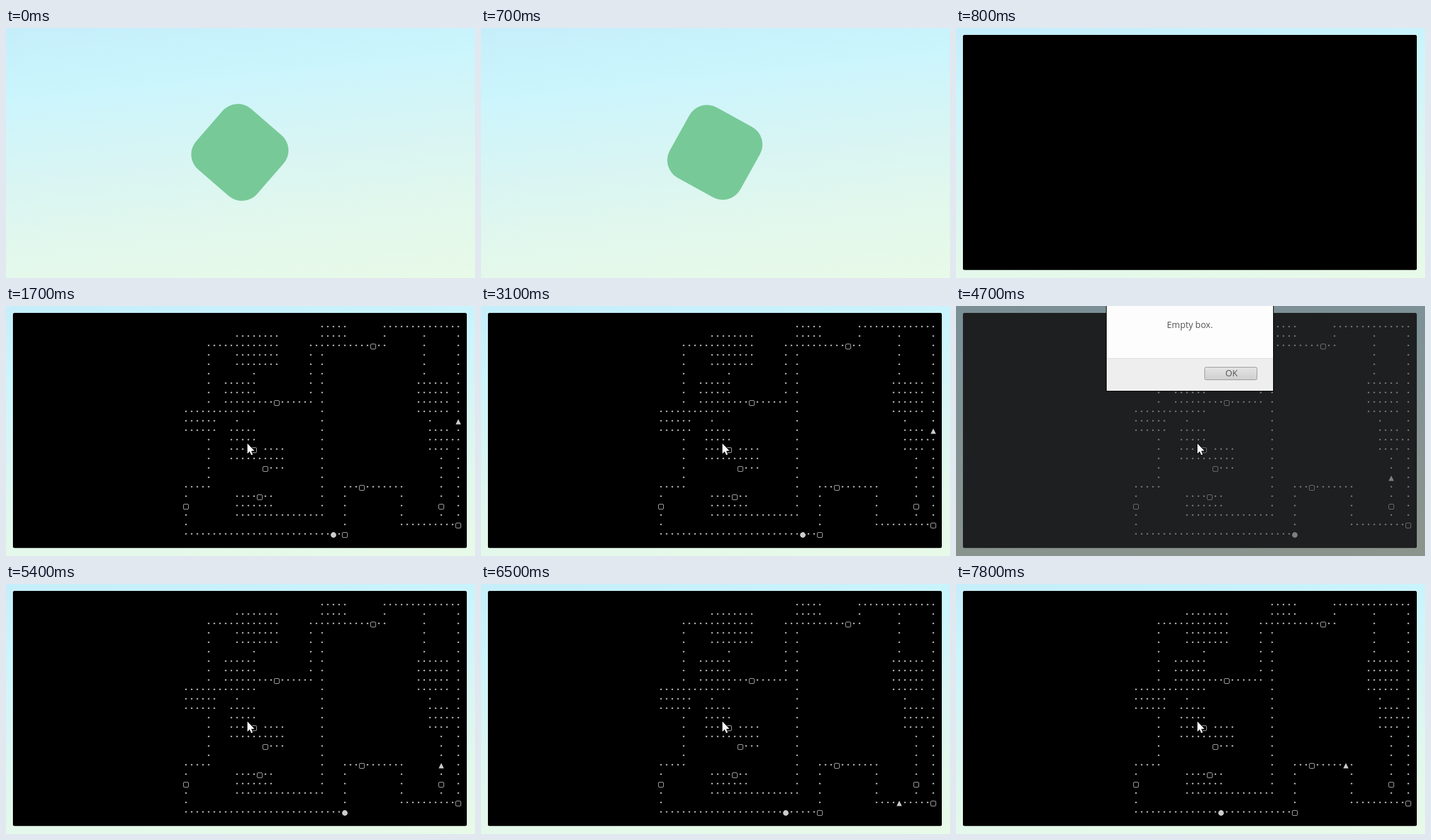
Animation, 744 px wide and 398 px high, one loop 8 s. Source, as an HTML page:

```html
<!DOCTYPE html>
<html lang="en">
<head>
<meta charset="utf-8">
<title>Box hunt</title>
<style>
  html, body { margin: 0; width: 100%; height: 100%; overflow: hidden; }
  body {
    background: linear-gradient(174deg, #c5eefa 0%, #cbf5fd 23%, #d9f5f3 52%, #e2f8ec 76%, #e8fae8 100%);
  }
  svg { display: block; width: 744px; height: 398px; }
  text { font: 14px "Open Sans", "Noto Sans", sans-serif; fill: #555; text-anchor: middle; }
  .glyph { fill: #ccc; }
  .chest { fill: none; stroke: #aaa; }
</style>
</head>
<body>
<svg viewBox="0 0 744 398">
  <defs>
    <linearGradient id="face" x2="0" y2="1">
      <stop stop-color="#e4e4e4"/>
      <stop offset="1" stop-color="#cfcfcf"/>
    </linearGradient>
  </defs>

  <rect id="spinner" x="-64" y="-64" width="128" height="128" rx="32" fill="#78c998"/>

  <rect id="panel" x="11" y="11" width="720" height="374.2" rx="2.5"/>

  <g id="board">
    <g id="tiles"></g>
    <circle id="player" class="glyph" r="4.4"/>
    <path id="hunter" class="glyph" d="M0-4.5 4.2 4H-4.2Z"/>
  </g>

  <g id="dialog">
    <rect width="744" height="398" fill="rgb(58,59,61)" fill-opacity=".53"/>
    <rect x="238.5" y="-5.5" width="265" height="141" fill="#fdfdfd" stroke="#000"/>
    <rect x="239" y="83" width="264" height="52" fill="#eee"/>
    <rect x="239" y="83" width="264" height="1" fill="#dcdcdc"/>
    <text x="371" y="35">Empty box.</text>
    <rect x="394.5" y="97.5" width="83" height="20" rx="2" fill="url(#face)" stroke="#999"/>
    <text x="437" y="112">OK</text>
  </g>

  <path id="cursor" d="M0 0V16L3.6 12.6 6 18.3 8.4 17.3 6 11.7 11 11.5Z"
        fill="#fff" stroke="#000" stroke-width="1.6" paint-order="stroke"/>
</svg>

<script>
const LOOP = 8000, TICK = 100;
const $ = id => document.getElementById(id);

// Dungeon plan in tiles: rooms as column, row, width, height; corridors as path commands.
const rooms = [
  [24, 0, 5, 2], [9, 1, 8, 4], [7, 6, 6, 3], [41, 6, 6, 4], [0, 9, 6, 3],
  [8, 11, 5, 4], [43, 11, 4, 3], [14, 13, 4, 3], [9, 18, 7, 3]
];
const corridors = "M12 8H22V2H35V0H48V21H38V17H28V22H0V17H4V11 M9 2H4V9 M24 1V20H15 " +
  "M12 4V6 M5 9H12 M9 9V11 M42 0V6 M43 9V11 M46 12H48 M45 13V21 M12 14H14";
const chests = "33,2 16,8 12,13 14,15 31,17 13,18 0,19 45,19 48,21 28,22".split(" ");

const px = c => 285.5 + 9 * c;
const py = r => 33 + 15 * r;
const place = (el, x, y) => el.setAttribute("transform", `translate(${x} ${y})`);
const show = (el, on) => { el.style.visibility = on ? "visible" : "hidden"; };

function addShape(tag, attrs) {
  const el = document.createElementNS("http://www.w3.org/2000/svg", tag);
  for (const name in attrs) el.setAttribute(name, attrs[name]);
  return $("tiles").appendChild(el);
}

const tiles = {};
function dig(c, r) {
  const key = c + "," + r;
  tiles[key] ??= chests.includes(key)
    ? addShape("rect", { class: "chest", x: px(c) - 4, y: py(r) - 2.5, width: 8, height: 8, rx: 1.5 })
    : addShape("circle", { class: "glyph", cx: px(c), cy: py(r) - .2, r: 1.25 });
}

for (const [c, r, w, h] of rooms)
  for (let i = 0; i < w * h; i++) dig(c + i % w, r + Math.floor(i / w));

let c = 0, r = 0;
for (const [, cmd, a, b] of corridors.matchAll(/([MHV])(\d+) ?(\d*)/g)) {
  if (cmd === "M") [c, r] = [+a, +b];
  const toC = cmd === "H" ? +a : c, toR = cmd === "V" ? +a : r;
  dig(c, r);
  while (c !== toC || r !== toR) {
    c += Math.sign(toC - c);
    r += Math.sign(toR - r);
    dig(c, r);
  }
}

function neighbours([c, r]) {
  const near = [];
  for (let dc = -1; dc <= 1; dc++)
    for (let dr = -1; dr <= 1; dr++)
      if ((dc || dr) && tiles[[c + dc, r + dr]]) near.push([c + dc, r + dr]);
  return near;
}

// One step along the shortest way: search outward from the goal until it touches the seeker.
function stepToward(from, goal) {
  const seen = new Set([String(goal)]);
  const queue = [goal];
  for (const cell of queue)
    for (const next of neighbours(cell)) {
      if (String(next) === String(from)) return cell;
      if (!seen.has(String(next))) queue.push(next);
      seen.add(String(next));
    }
  return from;
}

// Bursts of key presses; the hunter answers every turn.
const bursts = [
  { at: 3060, every: 160, count: 2, dir: -1 },
  { at: 3680, every: 230, count: 4, dir: 1 },
  { at: 5400, every: 0, count: 1, dir: 0 },
  { at: 5700, every: 160, count: 7, dir: -1 },
  { at: 7000, every: 160, count: 6, dir: -1 }
];

const turns = [{ time: 0, player: [26, 22], hunter: [48, 10] }];
for (const { at, every, count, dir } of bursts)
  for (let i = 0; i < count; i++) {
    const last = turns.at(-1);
    const player = [last.player[0] + dir, last.player[1]];
    turns.push({
      time: TICK * Math.round((at + i * every) / TICK),
      player,
      hunter: stepToward(last.hunter, player)
    });
  }

let covered = [];
function drawPieces(t) {
  const turn = turns.findLast(({ time }) => time <= t);
  covered.forEach(tile => { tile.style.display = ""; });
  covered = ["player", "hunter"].map(name => {
    const [c, r] = turn[name];
    place($(name), px(c), py(r) + 1.5);
    return tiles[[c, r]];
  });
  covered.forEach(tile => { tile.style.display = "none"; });
}

function draw(t) {
  const tick = Math.floor(t / TICK);
  show($("spinner"), t < 800);
  $("spinner").setAttribute("transform", `translate(371 198) rotate(${41 + 24 * tick})`);
  show($("panel"), t >= 800);
  show($("board"), t >= 1000);
  show($("dialog"), t >= 4700 && t < 5400);
  drawPieces(t);

  const k = Math.min(Math.max((tick - 13) / 4, 0), 1);
  const p = Math.sin(k * Math.PI / 2);
  show($("cursor"), t >= 1300);
  place($("cursor"), 368 + 15 * p, 48 + 171 * p);
}

const start = performance.now();
function loop() {
  draw((performance.now() - start) % LOOP);
  requestAnimationFrame(loop);
}
loop();
</script>
</body>
</html>
```
